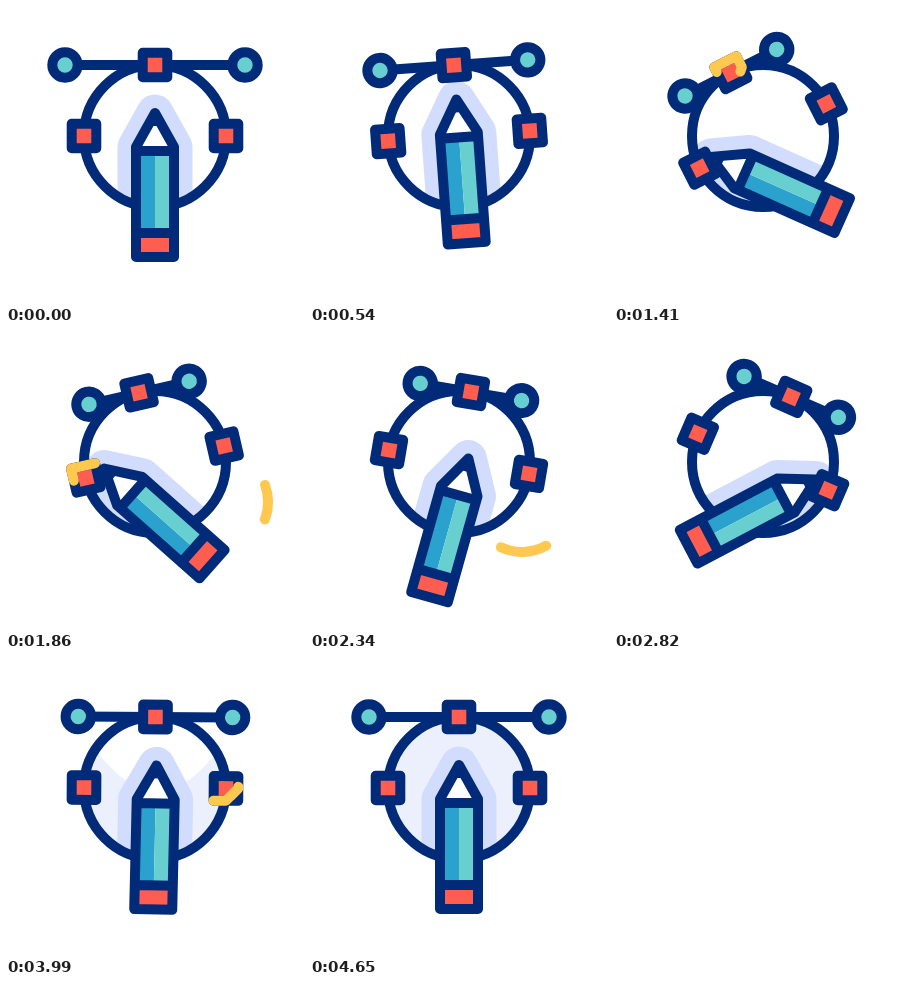
An HTML page with a canvas that plays this animation: 298 px wide and 298 px high, repeating every 4830 ms.

```html
<!DOCTYPE html>
<html lang="en">
<head>
<meta charset="utf-8">
<title>Pencil and anchor points</title>
<style>
  html, body { margin: 0; height: 100%; overflow: hidden; background: #fff; }
  canvas { display: block; width: 100vw; height: 100vh; }
</style>
</head>
<body>
<canvas id="stage" width="298" height="298"></canvas>
<script>
const ctx = document.getElementById('stage').getContext('2d');
const LOOP = 4830, STEP = 30, CX = 149, CY = 130, R = 71, LINE = 10;
const NAVY = '#012b78', RED = '#ff5d50', TEAL = '#68cfd1', BLUE = '#2ba1ce',
      HALO = '#d2dcfd', TINT = '#ecf0fc', GOLD = '#ffc84f';

const rad = deg => deg * Math.PI / 180;
const ramp = (t, a, b) => Math.min(1, Math.max(0, (t - a) / (b - a)));
const ease = (t, a, b) => (1 - Math.cos(Math.PI * ramp(t, a, b))) / 2;

// The whole drawing swings left, right and back.
const spin = t => -28 * ease(t, 300, 1255) + 52 * ease(t, 1255, 2930) - 24 * ease(t, 2930, 4080);

// Half the length of the handle bar: pulled in, then let out.
const reach = t => 90 - 38.6 * (ease(t, 300, 840) - ease(t, 3570, 4260));

// Pencil inside the swinging drawing: up to the top anchor, to the left one, the right one, home.
function pencilPose(t) {
  const up = ease(t, 300, 870), left = ease(t, 870, 1380),
        right = ease(t, 1700, 2865), home = ease(t, 3170, 4080);
  const side = (2 * right - left) * (1 - home);
  return [56 * side, -23 - 36 * up + 54 * left - 18 * home, 39 * side];
}

function stroke(color, width = LINE) {
  ctx.strokeStyle = color;
  ctx.lineWidth = width;
  ctx.stroke();
}

function fill(color) {
  ctx.fillStyle = color;
  ctx.fill();
}

function box(x, y, w, h, color) {
  ctx.fillStyle = color;
  ctx.fillRect(x, y, w, h);
}

function circle(x, y, r) {
  ctx.beginPath();
  ctx.arc(x, y, r, 0, 7);
}

function polyline(points) {
  ctx.beginPath();
  for (const p of points) ctx.lineTo(...p);
}

function placed([x, y, deg], draw) {
  ctx.save();
  ctx.translate(x, y);
  ctx.rotate(rad(deg));
  draw();
  ctx.restore();
}

function pencilPath() {
  polyline([[0, 0], [19, 34], [19, 144], [-19, 144], [-19, 34]]);
  ctx.closePath();
}

function pencil() {
  pencilPath();
  fill('#fff');
  box(-19, 38, 19, 82, BLUE);
  box(0, 38, 19, 82, TEAL);
  box(-19, 120, 38, 24, RED);
  box(-5, 4, 10, 9, NAVY);
  pencilPath();
  for (const y of [38, 120]) {
    ctx.moveTo(-19, y);
    ctx.lineTo(19, y);
  }
  stroke(NAVY);
}

// Gold swoosh along a circle, drawn on and then wiped off.
function swoosh(x, y, from, to, start) {
  const tail = ramp(t0, start + 330, start + 780), head = ramp(t0, start, start + 400);
  if (head <= tail) return;
  const at = u => rad(from + (to - from) * u);
  ctx.beginPath();
  ctx.arc(x, y, 50, at(tail), at(head), to < from);
  stroke(GOLD);
}

// Anchor square; from the start time a gold line runs once around it.
function anchor(x, y, start) {
  const s = 12.3;
  ctx.beginPath();
  ctx.rect(x - s, y - s, 2 * s, 2 * s);
  fill(RED);
  stroke(NAVY);
  const tail = 4 * ramp(t0, start + 520, start + 800), head = 4 * ramp(t0, start, start + 690);
  if (head <= tail) return;
  const edge = u => s * Math.max(-1, Math.min(1, 3 - 2 * Math.abs(u - 2)));
  const points = [];
  const at = u => [x + s * (2 * ramp(u, 1, 2) - 2 * ramp(u, 3, 4) - 1), y - edge(u + 0.5)];
  for (let u = tail; u < head; u += 0.02) points.push(at(u));
  polyline([...points, at(head)]);
  stroke(GOLD);
}

// Pale tint rising inside the circle under a dished surface.
function tint(t) {
  if (t < 3600) return;
  const level = t < 4650 ? 95 + 160 * (1 - ramp(t, 3600, 4620)) ** 3 : 0;
  ctx.beginPath();
  for (let x = 76; x <= 224; x += 4) ctx.lineTo(x, level - 0.0108 * (x - 151) ** 2);
  ctx.lineTo(224, 300);
  ctx.lineTo(76, 300);
  fill(TINT);
}

let t0 = 0;
function draw(t) {
  t0 = t;
  const swing = [CX, CY, spin(t)], pose = pencilPose(t), half = reach(t);
  box(0, 0, 298, 298, '#fff');
  ctx.lineJoin = ctx.lineCap = 'round';

  swoosh(106, 206, 180, 60, 540);
  swoosh(212, 170, -20, 115, 1740);

  ctx.save();
  circle(CX, CY, R);
  ctx.clip();
  tint(t);
  placed(swing, () => placed(pose, () => {
    pencilPath();
    stroke(HALO, 37);
  }));
  ctx.restore();

  circle(CX, CY, R);
  stroke(NAVY);

  placed(swing, () => {
    polyline([[-half, -R], [half, -R]]);
    stroke(NAVY);
    for (const x of [-half, half]) {
      circle(x, -R, 12.7);
      fill(TEAL);
      stroke(NAVY);
    }
    placed(pose, pencil);
    anchor(0, -R, 870);
    anchor(-R, 0, 1440);
    anchor(R, 0, 3265);
  });
}

const start = performance.now();
function frame(now) {
  const t = Math.max(0, now - start) % LOOP;
  draw(Math.floor(t / STEP) * STEP);
  requestAnimationFrame(frame);
}
draw(0);
requestAnimationFrame(frame);
</script>
</body>
</html>
```
